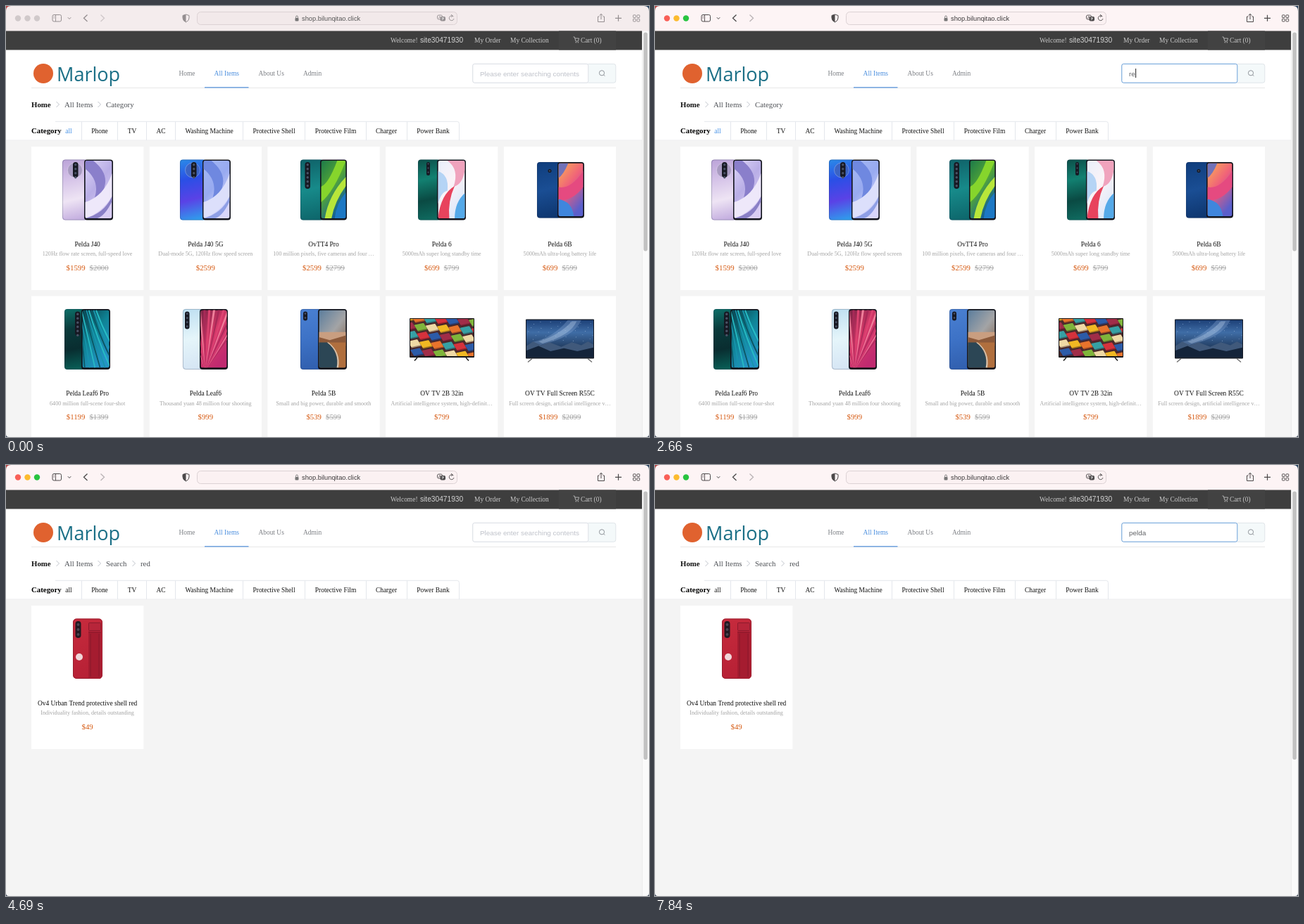
An HTML page with a canvas that plays this animation: 913x613 px, repeating every 8 s.

```html
<!DOCTYPE html>
<html lang="en">
<head>
<meta charset="utf-8">
<title>Shop search</title>
<style>
html, body { margin: 0; width: 100%; height: 100%; overflow: hidden; background: #fff; }
canvas { display: block; }
</style>
</head>
<body>
<canvas id="stage" width="913" height="613"></canvas>
<script>
const ctx = document.getElementById('stage').getContext('2d');
const LOOP = 8000;
const SERIF = '"Liberation Serif", "Times New Roman", serif';
const SANS = '"Liberation Sans", Arial, sans-serif';
const BLUE = [64, 142, 230], BORDER_FOCUS = [106, 160, 218], GREY = [220, 223, 230], INK = [20, 20, 20];

// Timeline
const ACTIVATE = 910, NAVIGATE = 4340, RESULTS = 4690;
const TYPING = [[0, ''], [2450, 'r'], [2660, 're'], [2870, 'red'], [NAVIGATE, ''],
  [6300, 'p'], [6440, 'pe'], [6650, 'pel'], [7210, 'peld'], [7350, 'pelda']];
const CARET = [[1540, 2170], [2310, 3360], [3920, 4130], [5530, 6160], [6300, 7840]];

const ramp = (t, a, b) => Math.min(1, Math.max(0, (t - a) / (b - a)));
const mix = (a, b, p) => `rgb(${a.map((v, i) => Math.round(v + (b[i] - v) * p))})`;

function rect(x, y, w, h, fill, r = 0) {
  ctx.beginPath();
  ctx.roundRect(x, y, w, h, r);
  ctx.fillStyle = fill;
  ctx.fill();
}
function frame(x, y, w, h, color, r = 0, width = 1) {
  ctx.beginPath();
  ctx.roundRect(x, y, w, h, r);
  ctx.strokeStyle = color;
  ctx.lineWidth = width;
  ctx.stroke();
}
function circle(x, y, r, fill) {
  ctx.beginPath();
  ctx.arc(x, y, r, 0, Math.PI * 2);
  ctx.fillStyle = fill;
  ctx.fill();
}
function path(d, color, width = 1, fill) {
  const p = new Path2D(d);
  if (fill) { ctx.fillStyle = fill; ctx.fill(p); }
  if (color) { ctx.strokeStyle = color; ctx.lineWidth = width; ctx.stroke(p); }
}
function text(s, x, y, size, color, { font = SERIF, align = 'left', weight = '' } = {}) {
  ctx.font = `${weight} ${size}px ${font}`;
  ctx.textAlign = align;
  ctx.fillStyle = color;
  ctx.fillText(s, x, y);
}
function gradient(x0, y0, x1, y1, colors) {
  const g = ctx.createLinearGradient(x0, y0, x1, y1);
  colors.forEach((c, i) => g.addColorStop(i / (colors.length - 1), c));
  return g;
}
// Draws inside a clipped box whose own coordinates run from 0 to 100
function panel(x, y, w, h, r, draw) {
  ctx.save();
  ctx.beginPath();
  ctx.roundRect(x, y, w, h, r);
  ctx.clip();
  ctx.translate(x, y);
  ctx.scale(w / 100, h / 100);
  draw();
  ctx.restore();
}

const shapes = list => () => list.forEach(([color, d]) => path(d, null, 0, color));
const ribbons = (dark, light, shine) => shapes([
  [dark, 'M30 0Q125 35 20 80Q70 40 0 14V0Z'],
  [light, 'M0 72Q70 62 100 22V62Q60 92 0 100Z'],
  [shine, 'M0 100Q70 92 100 62V70Q75 95 45 100Z'],
]);
const rays = colors => () => {
  for (let i = 0; i < 10; i++) {
    path(`M${i * 9 - 30} 0Q${i * 11 - 10} 50 ${i * 19 - 10} 100`, colors[i % colors.length], 4);
  }
};
const burst = colors => () => {
  for (let i = 0; i < 14; i++) {
    path(`M18 105L${i * 20 - 70} -10L${i * 20 - 61} -10Z`, null, 0, colors[i % colors.length]);
  }
};
const beach = shapes([
  ['#c99e80', 'M0 38H100V56H0Z'],
  ['#8c5a3b', 'M0 47L40 52L100 44V62H0Z'],
  ['#b06f3e', 'M35 56H100V100H70Q75 75 35 56Z'],
  ['#2c4655', 'M0 56H30Q75 72 66 100H0Z'],
  ['#d8c6b2', 'M30 56Q78 72 66 100H72Q82 73 36 56Z'],
]);

function phone({ x, w, top = 218.5, h = 86, back, front, screen, art, cam, camTop = 3.5, camW = 7.5, camH = 22, lens = '#171923', ring }) {
  const bw = front - x + 5, fw = x + w - front;
  rect(x, top, bw, h, gradient(x, top, x + bw * .6, top + h, back), 4);
  frame(x + .4, top + .4, bw - .8, h - .8, 'rgba(20,30,60,.3)', 4, .8);
  if (ring) {
    circle(x + 18, top + 15, 10.5, ring);
    frame(x + 7.5, top + 4.5, 21, 21, 'rgba(255,255,255,.35)', 10.5, .8);
  }
  rect(cam, top + camTop, camW, camH, lens, camW / 2);
  for (let y = camW / 2; y < camH; y += 6) circle(cam + camW / 2, top + camTop + y, camW * .22, '#4a5266');
  rect(front, top, fw, h, '#12141c', 4);
  const sx = front + 1.4, sy = top + 1.5;
  panel(sx, sy, fw - 2.8, h - 4, 3, () => {
    rect(0, 0, 100, 100, gradient(0, 0, 60, 100, screen));
    art();
  });
}
function cubeTv() {
  rect(573, 444, 92, 56, '#18181b', 1);
  const hues = ['#f0b823', '#d5323c', '#7fb53b', '#e8732c', '#2c5ba8', '#efd9a5', '#36a0a4', '#a02d48'];
  panel(574, 445, 90, 53, 0, () => {
    rect(0, 0, 100, 100, '#4b2a2c');
    for (let i = 0; i < 35; i++) {
      const row = Math.floor(i / 7);
      ctx.save();
      ctx.translate((i % 7) * 18 - 5 + row * 4, row * 23 + 3 + (i % 7) * 2 - 5);
      ctx.rotate(-.35);
      rect(-8, -10, 16, 19, hues[(i * 3 + row * 2) % 8], 1);
      rect(-8, 6, 16, 4, 'rgba(40,10,20,.35)');
      ctx.restore();
    }
  });
  path('M584 500L580 504.5M653 500L657 504.5', '#222', 1.6);
}
function nightTv() {
  rect(738, 445.5, 97, 56, '#141a24', 1);
  panel(739, 446.5, 95, 53, 0, () => {
    rect(0, 0, 100, 100, gradient(0, 0, 0, 100, ['#1c3f76', '#3f6da6', '#27456d', '#0e1a2c']));
    path('M8 60Q40 48 62 0H82Q72 46 20 68Z', null, 0, 'rgba(150,180,220,.3)');
    path('M18 58Q48 42 68 4H75Q66 42 24 63Z', null, 0, 'rgba(190,212,238,.35)');
    for (let i = 0; i < 36; i++) circle(i * 37 % 100, i * 23 % 58, .6, '#b8d0ea');
    path('M0 70L10 58L22 68L34 60L52 72L68 60L82 68L92 58L100 66V100H0Z', null, 0, '#40597b');
    path('M0 82L18 70L36 84L56 76L76 84L100 74V100H0Z', null, 0, '#14243a');
  });
  path('M747 501.5L741 506.5M826 501.5L832 506.5', '#666', 1.2);
}
function redCase() {
  rect(95, 218.5, 42, 85.5, gradient(95, 219, 137, 304, ['#c72b3d', '#b41f34']), 5);
  frame(95.5, 219, 41, 84.5, '#8f1a2a', 5, .8);
  rect(98.5, 222, 8, 24, '#221820', 4);
  for (let i = 0; i < 3; i++) circle(102.5, 227 + i * 7, 2, '#4a4450');
  rect(117, 235, 18, 69, '#a51c30', 2);
  rect(117, 224, 18, 13, '#b7253a', 1);
  frame(117.5, 224.5, 17, 11, '#82182a', 1, .8);
  path('M117 238H135M120 240V301M132 240V301', '#7d1729', .7);
  circle(104, 273, 5, '#f0d5d8');
}

const PRODUCTS = [
  ['Pelda J40', '120Hz flow rate screen, full-speed love', '$1599', '$2000', () => phone({ x: 80, w: 72, front: 111, cam: 95, ring: '#a99bc2',
    back: ['#bba3d8', '#d5c3e8', '#eee4f4', '#c3addf'], screen: ['#ded6f7', '#b9aee6', '#d9cdf3'], art: ribbons('#8a7fcb', '#eee8fa', '#8a80c6') })],
  ['Pelda J40 5G', 'Dual-mode 5G, 120Hz flow speed screen', '$2599', '', () => phone({ x: 247, w: 72, front: 279, cam: 263, ring: '#3b63c4',
    back: ['#2b8be8', '#2a4fe6', '#5a42e6', '#2f9cec'], screen: ['#a4b8f4', '#98aaf0', '#d8d6fb'], art: ribbons('#6f88e0', '#dcdffb', '#8fa0e6') })],
  ['OvTT4 Pro', '100 million pixels, five cameras and four …', '$2599', '$2799', () => phone({ x: 418, w: 66, front: 446, cam: 424.5, camH: 38,
    back: ['#0f6168', '#178a8a', '#0d666b'], screen: ['#1d7a4a', '#55a835', '#0d57a0'], art: shapes([
      ['#86d52c', 'M0 45Q30 40 65 0H100Q50 55 0 72Z'],
      ['#b8e63a', 'M15 100Q30 60 100 28V44Q55 70 42 100Z'],
      ['#1d78c4', 'M55 100Q60 75 100 55V100Z']]) })],
  ['Pelda 6', '5000mAh super long standby time', '$699', '$799', () => phone({ x: 585, w: 68, front: 612, cam: 597, camW: 5, camH: 19,
    back: ['#0c4f49', '#128071', '#0a4a43', '#0f6b60'], screen: ['#e8effb', '#fbf3f7', '#dce8fa'], art: shapes([
      ['#f0a3bd', 'M35 0Q80 15 58 45Q92 42 100 15V0Z'],
      ['#b5d4f5', 'M0 18Q42 25 35 52Q10 55 0 75Z'],
      ['#e8435d', 'M0 100Q10 58 62 44Q36 70 42 100Z'],
      ['#55a9e8', 'M62 100Q62 72 100 56V100Z']]) })],
  ['Pelda 6B', '5000mAh ultra-long battery life', '$699', '$599', () => phone({ x: 754, w: 67, front: 783, top: 222, h: 79.5, cam: 769.5, camTop: 10, camW: 5, camH: 5,
    back: ['#0f3d7c', '#1a4e94', '#0e366f'], screen: ['#f9b254', '#f0607a', '#5a5fcc'], art: shapes([
      ['#7272b8', 'M0 0H40Q20 22 0 28Z'],
      ['#e54a80', 'M0 45Q50 50 100 15V45Q55 72 0 70Z'],
      ['#3f86dd', 'M0 68Q55 72 62 100H0Z']]) })],
  ['Pelda Leaf6 Pro', '6400 million full-scene four-shot', '$1199', '$1399', () => phone({ x: 83, w: 65, front: 107, top: 431, cam: 98, camH: 34,
    back: ['#0d7069', '#0a3a3b', '#092d30', '#085f57'], screen: ['#0a3a44', '#0f8496', '#2494c6'], art: rays(['#27bcc4', '#0c5563', '#1795ad']) })],
  ['Pelda Leaf6', 'Thousand yuan 48 million four shooting', '$999', '', () => phone({ x: 251, w: 64, front: 275, top: 431, cam: 254, camW: 6.5, camH: 25,
    back: ['#bedff1', '#e5f5fa', '#d5e5f4'], screen: ['#7a2244', '#d83a6a', '#c02a70'], art: burst(['#f0809b', '#a82a58', '#de4472']) })],
  ['Pelda 5B', 'Small and big power, durable and smooth', '$539', '$599', () => phone({ x: 418, w: 66, front: 443, top: 431, cam: 422, camW: 6, camH: 13,
    back: ['#4a80d2', '#3d72c6', '#315fae'], screen: ['#5b7d9d', '#a3a4a6', '#7c5b42'], art: beach })],
  ['OV TV 2B 32in', 'Artificial intelligence system, high-definit…', '$799', '', cubeTv],
  ['OV TV Full Screen R55C', 'Full screen design, artificial intelligence v…', '$1899', '$2099', nightTv],
];
const FOUND = ['Ov4 Urban Trend protective shell red', 'Individuality fashion, details outstanding', '$49', '', redCase];

function card([name, note, price, old, draw], i) {
  const x = 36 + (i % 5) * 167.7, y = 200 + Math.floor(i / 5) * 212.6, cx = x + 79.6;
  rect(x, y, 159.3, 204, '#fff');
  draw();
  text(name, cx, y + 141.5, 9.45, '#111', { align: 'center' });
  text(note, cx, y + 155, 8.1, '#a4a4a4', { align: 'center' });
  ctx.font = `10.8px ${SERIF}`;
  const pw = ctx.measureText(price).width, ow = old ? ctx.measureText(old).width + 6 : 0;
  const px = cx - (pw + ow) / 2;
  text(price, px, y + 175.8, 10.8, '#d65a12');
  if (old) {
    text(old, px + pw + 6, y + 175.8, 10.8, '#a2a2a2');
    rect(px + pw + 6, y + 172, ow - 6, .8, '#a2a2a2');
  }
}

function toolbar(active) {
  rect(0, 0, 913, 36, active ? '#fdf4f5' : '#f4eced');
  const ink = active ? '#4c494a' : '#948e90', faint = active ? '#b9b2b4' : '#cfc7c9';
  const dots = active ? ['#f95f57', '#fcbb2e', '#28c440'] : Array(3).fill('#d0c9ca');
  dots.forEach((c, i) => circle(17 + i * 13.5, 17.5, 4.2, c));
  frame(66, 12.5, 12.5, 9.5, ink, 2);
  path('M70.5 12.5V22M67.8 15H69M67.8 17H69', ink, .9);
  path('M87.8 16.2L90 18.5L92.2 16.2', ink, 1);
  path('M115.5 12.5L110.5 17.3L115.5 22', ink, 1.3);
  path('M134.5 12.5L139.5 17.3L134.5 22', faint, 1.3);
  path('M255.5 12L260 13.5V17Q260 21 255.5 23Q251 21 251 17V13.5Z', ink, 1);
  path('M255.5 12L251 13.5V17Q251 21 255.5 23Z', null, 0, ink);
  rect(271.5, 8.5, 369, 18, active ? '#fbf1f2' : '#f2e9ea', 5);
  frame(271.5, 8.5, 369, 18, '#dcd2d4', 5);
  rect(410.5, 17, 5, 4.5, '#777', 1);
  path('M411.6 17V15.4A1.4 1.4 0 0 1 414.4 15.4V17', '#777', .9);
  text('shop.bilunqitao.click', 420, 21, 9.3, active ? '#3c3a3b' : '#555', { font: SANS });
  frame(612.5, 13, 7, 6, ink, 2, .9);
  rect(616.5, 15, 7.5, 6.5, ink, 2);
  text('A', 614, 18, 5.5, ink, { font: SANS });
  path('M618.5 17H622M620.2 16V19M618.7 20L621.8 17.8', '#fff', .6);
  path('M635.4 15.2A3.4 3.4 0 1 0 636 18M632 12.2L634.5 14.2L632 15.6', ink, .9);
  path('M842.5 15H840.5V22.5H849.5V15H847.5M845 19V11.5M842.8 13.5L845 11.2L847.2 13.5', ink, 1);
  path('M865 17.3H874M869.5 12.8V21.8', ink, 1.2);
  for (let i = 0; i < 4; i++) frame(890.5 + i % 2 * 5.5, 12.8 + (i >> 1) * 5.5, 3.7, 3.7, ink, .6, .9);
}

function header() {
  rect(0, 35.4, 903, 27, '#3e3e3e');
  rect(785, 35.4, 81, 27, '#424242');
  const pale = '#c9c9c9';
  text('Welcome!', 546, 51.8, 9.45, pale);
  text('site30471930', 588, 52, 10.2, '#d4d4d4', { font: SANS });
  text('My Order', 665, 51.8, 9.45, pale);
  text('My Collection', 716, 51.8, 9.45, pale);
  path('M805.5 44H807.2L809 50H812.5L813.5 46H808', pale, .8);
  circle(809.3, 51.8, .7, pale);
  circle(812.3, 51.8, .7, pale);
  text('Cart (0)', 816, 51.8, 9.45, pale);

  circle(53, 96, 14, '#e0622f');
  text('Marlop', 72, 107, 27, '#1a6f86', { font: '"Open Sans", sans-serif' });
  rect(36, 116, 830, 1, '#e8e8e8');
  [['Home', 257], ['All Items', 313.3], ['About Us', 376.6], ['Admin', 435]].forEach(([s, x], i) =>
    text(s, x, 99, 9.45, i === 1 ? '#4a8ede' : '#7c7f84', { align: 'center' }));
  rect(282, 115.2, 62.5, 1.4, '#5592dc');
}

function searchBox(t) {
  const focus = ramp(t, 1470, 1750) - ramp(t, 4130, 4340) + ramp(t, 5320, 5600);
  const query = TYPING.findLast(([at]) => t >= at)[1];
  rect(662.5, 82.5, 203.5, 27, '#f4f9fa', 3);
  frame(662.8, 82.4, 203, 26.8, '#e0e5e9', 3);
  rect(662.8, 82.4, 164.2, 26.8, '#fff', [3, 0, 0, 3]);
  frame(662.8, 82.4, 164, 26.8, mix(GREY, BORDER_FOCUS, focus), 2.5);
  text(query || 'Please enter searching contents', 673, 99.5, 9.87, query ? '#606266' : '#bfc2ca', { font: SANS });
  if (CARET.some(([on, off]) => t >= on && t < off)) {
    rect(673.3 + (query ? ctx.measureText(query).width : 0), 89, 1.1, 13, '#333');
  }
  frame(842.4, 91.7, 7.2, 7.2, '#858a90', 3.6, .9);
  path('M848.7 98L850.3 99.7', '#858a90', .9);
}

function categories(t) {
  const searched = t >= NAVIGATE;
  const crumbs = searched ? [['All Items', 83], ['Search', 142], ['red', 191]] : [['All Items', 83], ['Category', 142]];
  text('Home', 36, 143.7, 10.8, '#111', { weight: 'bold' });
  crumbs.forEach(([s, x]) => {
    text(s, x, 143.7, 10.8, '#4c4f54');
    path(`M${x - 11.5} 136L${x - 7.5} 140L${x - 11.5} 144`, '#c0c4cc', 1);
  });
  path('M70 164.3H640.5Q643.5 164.3 643.5 167.5V191', '#e4e7ec', 1);
  [107.5, 158.5, 199.5, 240.5, 336.5, 424.5, 511.5, 569.5].forEach(x => rect(x - .5, 164.5, 1, 26.5, '#e4e7ec'));
  const tabs = [['all', 89], ['Phone', 133], ['TV', 179], ['AC', 220], ['Washing Machine', 288.5],
    ['Protective Shell', 380.5], ['Protective Film', 468], ['Charger', 540], ['Power Bank', 606.5]];
  tabs.forEach(([s, x], i) =>
    text(s, x, 181.3, 9.45, mix(INK, BLUE, i ? 0 : 1 - ramp(t, NAVIGATE, 4620)), { align: 'center' }));
  text('Category', 36, 181, 10.85, '#000', { weight: 'bold' });
}

function corners() {
  path('M0 0H7Q0 0 0 7Z', null, 0, '#b64747');
  path('M913 0H906Q913 0 913 7Z', null, 0, '#26415f');
  path('M0 613V609Q0 613 4 613ZM913 613V609Q913 613 909 613Z', null, 0, '#3a4659');
}

function render(t) {
  const found = t >= RESULTS;
  rect(0, 0, 913, 613, '#fff');
  rect(0, 191, 903, 422, '#f4f4f4');
  rect(0, 190.5, 903, .8, '#e9ebef');
  (found ? [FOUND] : PRODUCTS).forEach(card);
  toolbar(t >= ACTIVATE);
  header();
  searchBox(t);
  categories(t);
  rect(903, 35.4, 10, 578, '#fafafa');
  rect(903, 35.4, .8, 578, '#e9e9e9');
  rect(905.3, 37.5, 5.6, found ? 381.5 : 311, '#c2c2c2', 2.8);
  corners();
}

const start = performance.now();
function tick() {
  render((performance.now() - start) % LOOP);
  requestAnimationFrame(tick);
}
tick();
</script>
</body>
</html>
```
